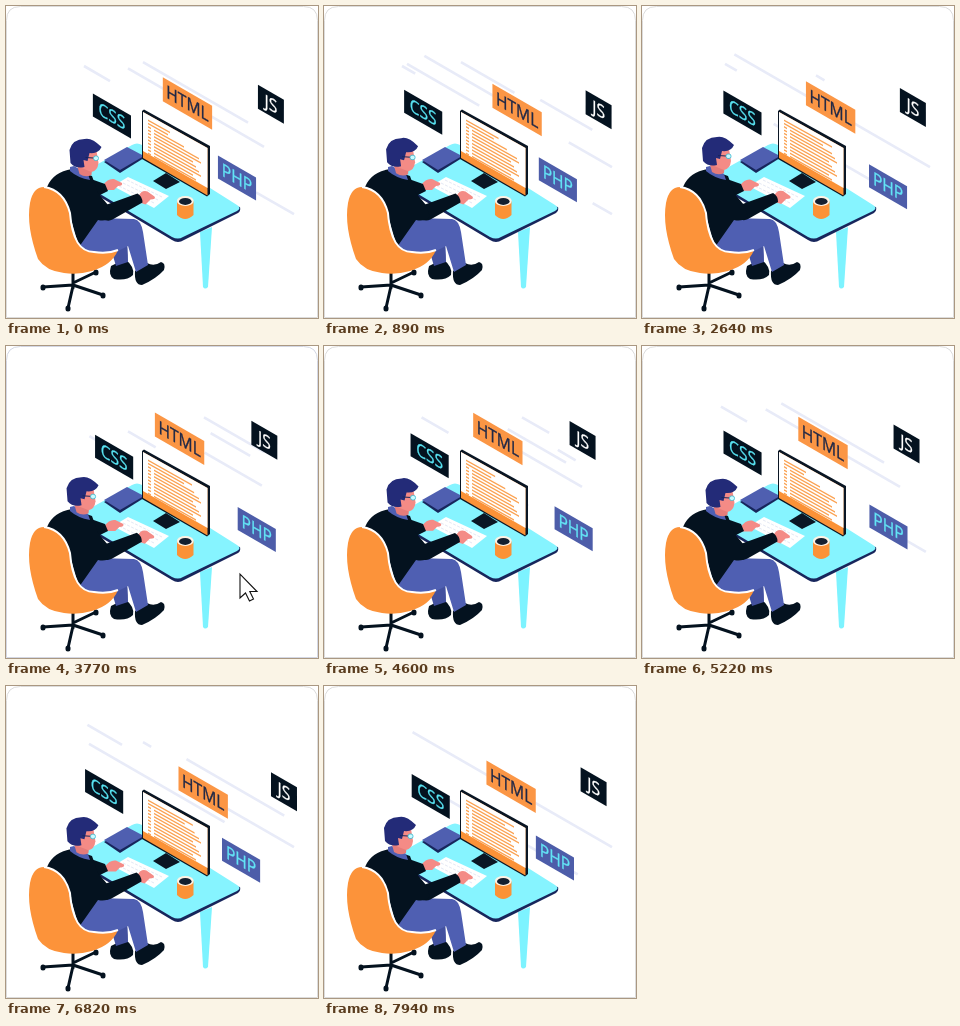
Write an HTML page that moves like this. It is 312x312 px and loops after 8000 ms.

```html
<!DOCTYPE html>
<html lang="en">
<head>
<meta charset="utf-8">
<title>Coding at a desk</title>
<style>
  html, body { margin: 0; width: 100%; height: 100%; overflow: hidden; background: #fff; }
  svg { display: block; width: 100vw; height: 100vh; }
  text { font: 18px "Open Sans", "Noto Sans", sans-serif; text-anchor: middle; stroke-width: .35; }
</style>
</head>
<body>
<svg viewBox="0 0 312 312">
  <path id="card" d="M.5 311.5V14.5Q.5.5 14.5.5H297.5Q311.5.5 311.5 14.5V311.5Z" fill="#fff" stroke="#dcdcdc"/>
  <g id="streaks" stroke="#e8ebf8" stroke-width="2.6"></g>
  <g id="labels"></g>

  <g id="desk">
    <path d="M194 226L206 221L202 281Q199 284 197 281Z" fill="#7df3ff"/>
    <path d="M74 175V179L166 234Q172 238 178 234L232 207Q235 205 234 201Z" fill="#17265c"/>
    <path d="M74 168L126 139Q131 136 136 139L231 199Q236 202 231 205L177 231Q172 234 166 231L74 176Z" fill="#86f4ff"/>
    <path d="M98 156L121 143L138 152L114 167Z" fill="#17265c"/>
    <path d="M98 154L121 141L138 150L114 164Z" fill="#4f5fb0"/>
    <path d="M107 180L122 171L163 190L148 202Z" fill="#fff"/>
    <path d="M113 180L148 197M117 177L152 194M121 174L156 191" stroke="#e3e8f4" stroke-dasharray="3 1.5"/>
  </g>

  <g id="monitor">
    <path d="M147 175L160 167L174 176L160 183Z" fill="#0a1624"/>
    <path d="M136 105L138 103.5L204 140V188L201 190.5L136 153Z" fill="#0a1624"/>
    <path d="M137 106L201.5 142V189.5L137 152Z" fill="#fb9237"/>
    <path d="M137 106L201.5 142V182L137 145Z" fill="#fff"/>
    <g id="code" stroke="#fba252" stroke-width="1.5" transform="matrix(1 .56 0 1 138 108)"></g>
  </g>

  <g id="cup">
    <path d="M171 195V209Q179 217 187.5 209V195Z" fill="#fb9237"/>
    <ellipse cx="179.3" cy="195" rx="8.4" ry="5" fill="#fff3e4"/>
    <ellipse cx="179.3" cy="195.4" rx="6.3" ry="3.5" fill="#142030"/>
  </g>

  <g id="person">
    <path d="M105 260L119 253Q129 261 127 269Q121 275 108 273Q102 270 105 260Z" fill="#04121f"/>
    <path d="M129 265L141 257Q148 261 155 256Q160 257 158 264Q150 273 136 279Q128 279 129 265Z" fill="#04121f"/>
    <path d="M78 240Q96 222 116 222Q122 228 122 256L110 260L104 240Z" fill="#43519f"/>
    <path d="M72 242L90 212L128 213Q135 214 137 226L142 259L130 266L122 240Q108 248 90 250Z" fill="#4f5fb2"/>
    <g id="farHand">
      <path d="M97 179Q102 172 108 173L116 177Q117 180 112 180L108 184L99 184Z" fill="#f48b86"/>
    </g>
    <path d="M82 172L99 178L102 185L90 191Z" fill="#04121f"/>
    <g id="nearHand">
      <path d="M132 190Q135 183 141 185L148 190Q150 193 144 193L139 198L133 196Z" fill="#f48b86"/>
      <path d="M95 200L131 187Q136 190 136 196L106 213Q99 217 90 207Z" fill="#04121f"/>
    </g>
    <path d="M66 163Q47 166 41 181Q58 190 64 210L73 241L92 214Q100 216 106 211L102 199L92 187L86 170Z" fill="#04121f"/>
    <path d="M64 161L68 160L82 168L84 174Q72 172 64 165Z" fill="#4f5fb2"/>
    <g id="head">
      <path d="M67 155L70 166Q76 170 82 167L83 156Z" fill="#e57c7a"/>
      <path d="M72 143H87L89 155Q88 163 82 164L72 160Z" fill="#f48b86"/>
      <path d="M60 142Q63 131 75 131Q82 129 92 139Q89 146 80 145L78 153L74 152L75 159Q66 161 61 155Z" fill="#232b78"/>
      <path d="M76 149.5L84 150" stroke="#17265c"/>
      <rect x="84" y="148" width="5" height="4.5" rx="2" fill="#c9faff" stroke="#35b8d0" stroke-width=".8"/>
    </g>
  </g>

  <g id="chair">
    <g stroke="#04121f" stroke-width="3" stroke-linecap="round" fill="none">
      <path d="M67 266V282M67 279L37 281M67 279L97 289M67 280L62 302M67 277L90 266"/>
      <path d="M37 281V282M97 289V290M62 302V303M90 266V267" stroke-width="5"/>
    </g>
    <path d="M24 197Q27 181 38 181Q58 184 64 207Q67 246 88 246Q102 248 112 244Q106 259 86 265Q72 269 58 267Q40 265 32 253Q20 220 24 197Z" fill="#fc933a"/>
    <path d="M38 181Q58 184 64 207Q67 246 88 246Q102 248 112 244" fill="none" stroke="#fff" stroke-width="2"/>
  </g>

  <path id="cursor" d="M0 0V24L5.5 19L9.5 27L13.5 25L9.8 17.5H17Z" fill="#fff" stroke="#111" stroke-width="1.1"/>
</svg>
<script>
const LOOP = 8000, STEP = LOOP / 115;
// Isometric projection of a wall
const ISO_X = Math.cos(Math.PI / 6), ISO_Y = 0.5, SLOPE = ISO_Y / ISO_X;
const SLIDE_PERIOD = 5.25, SLIDE_PEAK = 1.53;
const $ = id => document.getElementById(id);
const wave = (t, period, peak) => Math.cos((t - peak) * 2 * Math.PI / period);
const clamp = x => Math.max(0, Math.min(1, x));
const ease = x => { x = clamp(x); return x * x * (3 - 2 * x); };
const move = (node, x, y) => node.setAttribute('transform', `translate(${x} ${y})`);

function add(parent, tag, attrs, content = '') {
  const node = document.createElementNS('http://www.w3.org/2000/svg', tag);
  for (const key in attrs) node.setAttribute(key, attrs[key]);
  node.textContent = content;
  return parent.appendChild(node);
}

// x and y mark the centre of the slide of the top left corner
const labels = [
  { text: 'CSS', x: 83, y: 85.3, w: 44, h: 23, fill: '#04121f', ink: '#58e3f2', swing: 6.2, period: 4.55, peak: 3.9 },
  { text: 'HTML', x: 160, y: 73, w: 57, h: 24, fill: '#fb9645', ink: '#1f2847', swing: 12.5, period: SLIDE_PERIOD, peak: SLIDE_PEAK },
  { text: 'JS', x: 254.6, y: 80.2, w: 30, h: 24, fill: '#04121f', ink: '#ffffff', swing: 10.4, period: SLIDE_PERIOD, peak: SLIDE_PEAK },
  { text: 'PHP', x: 221.8, y: 155.2, w: 44, h: 23, fill: '#4d5da9', ink: '#63e4f5', swing: 10, period: 8.3, peak: 3.93 }
];
for (const label of labels) {
  label.node = add($('labels'), 'g', {});
  add(label.node, 'rect', { width: label.w, height: label.h, fill: label.fill });
  add(label.node, 'text', { x: label.w / 2, y: label.h / 2 + 6.3, fill: label.ink, stroke: label.ink }, label.text);
}

// Each streak: height at x = 78, then its start and end at every stop
const stops = [0, 1.7, 2.65, 3.77, SLIDE_PERIOD];
const streaks = [
  [2, [[198, 198], [198, 198], [198, 198], [198, 259], [198, 198]]],
  [14, [[257, 257], [174, 280], [174, 174], [205, 245], [257, 257]]],
  [22, [[137, 242], [137, 137], [137, 137], [242, 242], [137, 242]]],
  [37, [[122, 258], [78, 104], [78, 78], [200, 258], [122, 258]]],
  [40, [[288, 288], [200, 288], [83, 288], [288, 288], [288, 288]]],
  [55, [[83, 83], [83, 230], [83, 83], [83, 83], [83, 83]]],
  [60, [[78, 104], [78, 78], [122, 122], [122, 150], [78, 104]]],
  [87, [[250, 288], [288, 288], [118, 258], [83, 100], [250, 288]]]
].map(([height, spans]) => ({ height, spans, node: add($('streaks'), 'line', {}) }));

const codeLines = Array.from({ length: 11 }, (_, i) => {
  const y = 4 + i * 3.3;
  if (i > 1) add($('code'), 'line', { x1: 4, x2: 7, y1: y, y2: y });
  return add($('code'), 'line', { y1: y, y2: y });
});

function drawStreaks(t) {
  const phase = t % SLIDE_PERIOD;
  const i = stops.findIndex((stop, k) => phase < stops[k + 1]);
  const mix = (phase - stops[i]) / (stops[i + 1] - stops[i]);
  for (const { height, spans, node } of streaks) {
    const [from, to] = [0, 1].map(k => spans[i][k] + (spans[i + 1][k] - spans[i][k]) * mix);
    node.setAttribute('x1', from);
    node.setAttribute('x2', to);
    node.setAttribute('y1', height + (from - 78) * SLOPE);
    node.setAttribute('y2', height + (to - 78) * SLOPE);
    node.setAttribute('visibility', to - from > 6 ? 'visible' : 'hidden');
  }
}

function drawCursor(t) {
  const away = 1 - ease((t - 3.0) / 0.6) + ease((t - 4.0) / 0.5);
  move($('cursor'), 234 + 84 * away, 228 + 70 * away * (t < 3.8 ? 1 : 0.3));
  $('card').setAttribute('stroke', t > 3.1 && t < 4.4 ? '#d3d7e4' : '#dcdcdc');
}

function draw(t) {
  for (const { node, x, y, swing, period, peak } of labels) {
    const shift = swing * wave(t, period, peak);
    node.setAttribute('transform', `matrix(${ISO_X} ${ISO_Y} 0 1 ${x + shift} ${y + shift * SLOPE})`);
  }
  drawStreaks(t);
  drawCursor(t);

  const nod = ((1 + wave(t, SLIDE_PERIOD, 0)) / 2) ** 2;
  move($('head'), 3.5 * nod, 2 * nod);
  const tap = wave(t, 0.8, 0);
  move($('farHand'), 1 - tap, 0.8 - 0.8 * tap);
  move($('nearHand'), tap * 0.5, tap * 0.5);

  codeLines.forEach((line, i) => {
    const inset = i < 2 ? 4 : 10;
    const length = 48 - (i * 7 % 4) * 3 - (i < 3 ? nod * (26 - 7 * i) : 0);
    line.setAttribute('x1', inset);
    line.setAttribute('x2', Math.min(57, inset + length));
  });
}

function tick(now) {
  draw(Math.floor(now % LOOP / STEP) * STEP / 1000);
  requestAnimationFrame(tick);
}
tick(performance.now());
</script>
</body>
</html>
```
